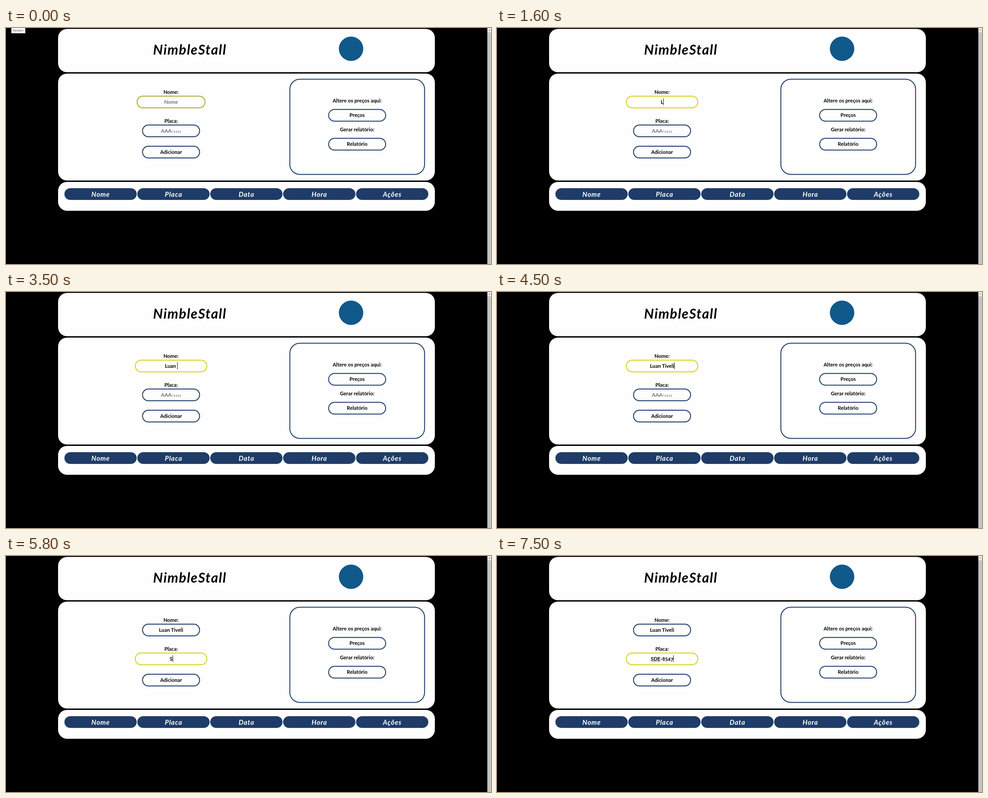
Animation of 1071 by 523 pixels, one loop 8000 ms. Source, as an HTML page:

```html
<!DOCTYPE html>
<html lang="pt-BR">
<head>
<meta charset="utf-8">
<title>Estacionamento</title>
<style>
  html, body { margin: 0; width: 100%; height: 100%; overflow: hidden; background: #000; }
  svg { display: block; width: 100%; height: 100%; font: 700 11.3px Lato, "Open Sans", sans-serif; }
  text { text-anchor: middle; white-space: pre; font-variant-numeric: oldstyle-nums; }
  .card { fill: #fefefe; }
  .outline { fill: none; stroke: #1f3c68; stroke-width: 2; }
  .head { fill: #1f3c68; }
  .title { font-size: 30px; font-style: italic; letter-spacing: 1.5px; }
  .column { font-size: 15px; font-style: italic; letter-spacing: .8px; fill: #fff; }
  .tip { font: 400 6.9px "Open Sans", sans-serif; fill: #444; }
  .hint { fill: #757575; }
  .small { font-size: 70%; }
</style>
</head>
<body>
<svg id="stage">
  <rect class="card" x="115" y="2" width="832" height="96" rx="20"/>
  <rect class="card" x="115" y="101" width="832" height="237" rx="20"/>
  <rect class="card" x="115" y="341" width="832" height="64" rx="20"/>
  <text class="title" x="406" y="58.5">NimbleStall</text>
  <circle cx="762" cy="46" r="27" fill="#11598a"/>
  <rect class="outline" x="626.8" y="113.5" width="297.5" height="211" rx="22"/>
  <rect x="1063" width="8" height="523" fill="#f1f1f1"/>
  <rect x="1063.5" y="9.5" width="7" height="513.5" fill="#c1c1c1"/>
  <path d="M1065 5.5L1067.2 3L1069.4 5.5Z" fill="#777"/>
  <g id="tip">
    <rect x="12" y="-1" width="30.5" height="12.5" fill="#fff" stroke="#999"/>
    <text class="tip" x="27.2" y="8.3">Restart</text>
  </g>
</svg>
<script>
const LOOP = 8000, STEP = 100, TRANSITION = 800, BLINK = 500;
const LEFT = 364.5, RIGHT = 775.4, REST_WIDTH = 126, GROWTH = 32;
const NAVY = [31, 60, 104], YELLOW = [219, 209, 33];
const stage = document.getElementById('stage');
const tip = document.getElementById('tip');

function set(el, attrs) {
  for (const key in attrs) el.setAttribute(key, attrs[key]);
}

function add(tag, attrs, text = '') {
  const el = document.createElementNS('http://www.w3.org/2000/svg', tag);
  set(el, attrs);
  el.textContent = text;
  stage.append(el);
  return el;
}

const label = (x, y, text) => add('text', { x, y }, text);

function pill(x, y) {
  return add('rect', {
    class: 'outline', x: x - REST_WIDTH / 2, y: y + 1,
    width: REST_WIDTH, height: 26, rx: 13
  });
}

function button(x, y, text) {
  pill(x, y);
  label(x, y + 17.8, text);
}

label(LEFT, 145.5, 'Nome:');
label(LEFT, 209.5, 'Placa:');
button(LEFT, 261, 'Adicionar');
label(RIGHT, 165.3, 'Altere os preços aqui:');
button(RIGHT, 179.6, 'Preços');
label(RIGHT, 229.3, 'Gerar relatório:');
button(RIGHT, 243.5, 'Relatório');

['Nome', 'Placa', 'Data', 'Hora', 'Ações'].forEach((name, i) => {
  const x = 129 + 161 * i;
  add('rect', { class: 'head', x, y: 355, width: 159.6, height: 26, rx: 13 });
  add('text', { class: 'column', x: x + 80, y: 373.8 }, name);
});

// Each key is [time, number of characters in the field].
function makeField(y, hint, value, focus, blur, keys, marks) {
  return {
    y, hint, value, focus, blur, keys, marks,
    box: pill(LEFT, y),
    text: add('text', { x: LEFT, y: y + 17.6 }),
    mark: add('rect', { y: y + 19, height: 1, fill: '#d8554f' }),
    caret: add('rect', { y: y + 6, width: 1, height: 15, fill: '#111' })
  };
}

const nameField = makeField(150, 'Nome', 'Luan Tiveli', 650, 4900,
  [[1600, 1], [1800, 2], [1900, 3], [2100, 4], [2200, 5], [2700, 3], [3400, 4], [3500, 5],
   [3800, 6], [4000, 7], [4100, 8], [4200, 9], [4400, 10], [4500, 11]],
  [[2900, 3400]]);
const plateField = makeField(214, 'AAA-<tspan class="small">1111</tspan>', 'SDE-8547', 4950, LOOP,
  [[5800, 1], [6000, 2], [6300, 3], [6600, 4], [6900, 5], [7000, 6], [7300, 7], [7500, 8]],
  [[6100, 6300], [6400, LOOP]]);

const clamp = v => Math.min(1, Math.max(0, v));
const ramp = (t, start) => clamp((t - start) / TRANSITION);

function drawField(field, t, open) {
  const { box, text, mark, caret } = field;
  const width = REST_WIDTH + GROWTH * open;
  const color = NAVY.map((c, i) => Math.round(c + (YELLOW[i] - c) * open));
  set(box, { x: LEFT - width / 2, width });
  box.style.stroke = `rgb(${color})`;

  const [since, count] = field.keys.filter(key => key[0] <= t).pop() || [field.focus, 0];
  if (count) text.textContent = field.value.slice(0, count);
  else text.innerHTML = field.hint;
  text.setAttribute('class', count ? '' : 'hint');

  const length = count ? text.getComputedTextLength() : 0;
  const start = LEFT - length / 2;
  const focused = t >= field.focus && t < field.blur;
  const caretOn = focused && (t - since) % (2 * BLINK) < BLINK;
  set(caret, { x: Math.round(start + length), visibility: caretOn ? 'visible' : 'hidden' });

  const marked = count && field.marks.some(([from, to]) => t >= from && t < to);
  set(mark, {
    x: start,
    width: marked ? text.getSubStringLength(0, Math.min(3, count)) : 0
  });
}

function draw(now) {
  const t = Math.floor(now % LOOP / STEP) * STEP;
  tip.style.display = t < 200 ? '' : 'none';
  const plateOpen = ramp(t, 4900);
  const nameOpen = t < 600 ? clamp(0.75 - t / TRANSITION) : ramp(t, 600) - plateOpen;
  drawField(nameField, t, nameOpen);
  drawField(plateField, t, plateOpen);
}

const begin = performance.now();
function tick() {
  draw(performance.now() - begin);
  requestAnimationFrame(tick);
}
tick();
</script>
</body>
</html>
```
